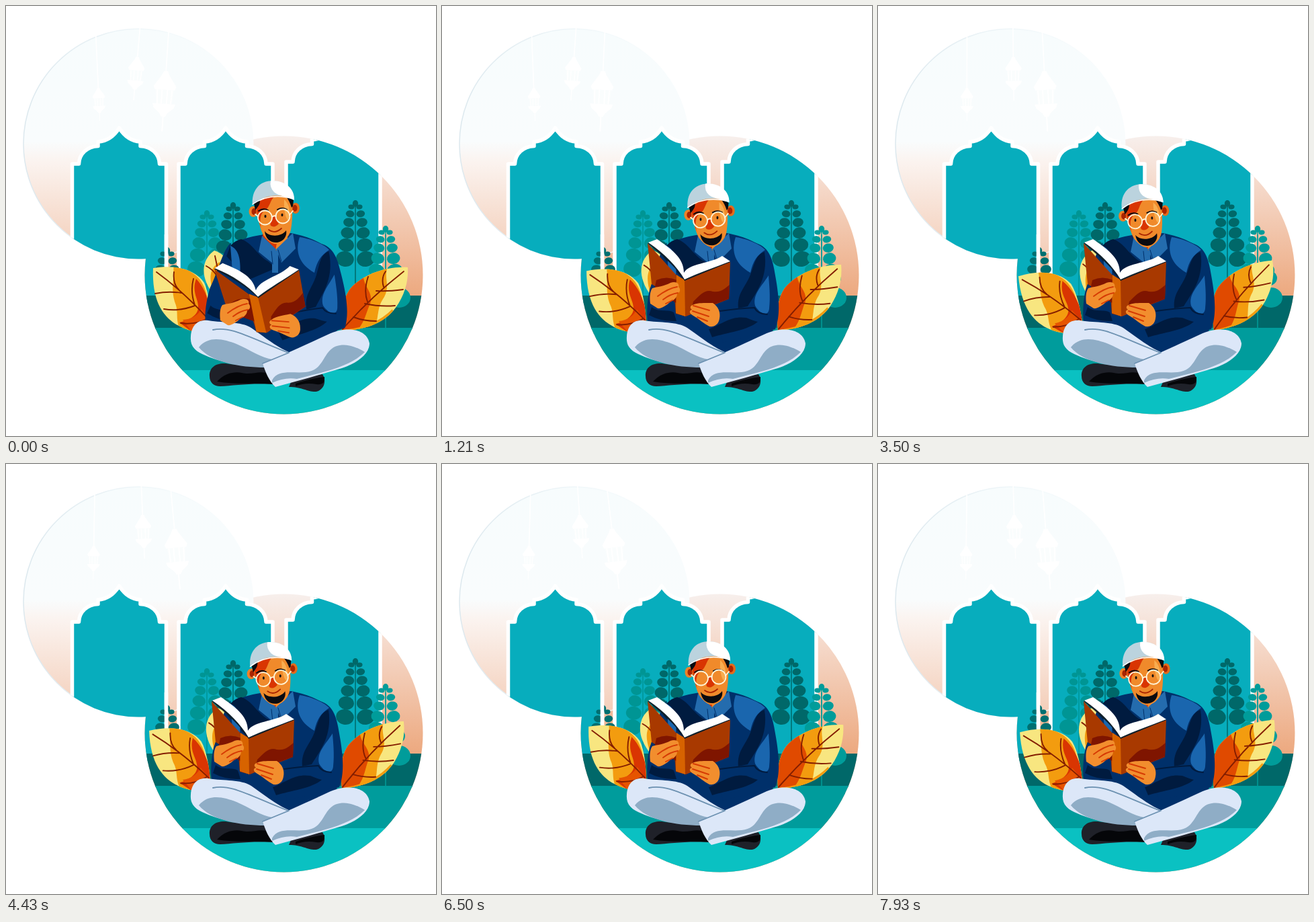
An HTML page for the animation above (8000 ms loop, 640 by 640 pixels).

```html
<!DOCTYPE html>
<html lang="en">
<head>
<meta charset="utf-8">
<title>Reading in the garden</title>
<style>
  html, body { margin: 0; width: 100%; height: 100%; overflow: hidden; background: #fff; }
  svg { display: block; width: 100vw; height: 100vh; }
  .line { fill: none; stroke-linecap: round; stroke-linejoin: round; }
  .vein { stroke: #841e00; stroke-width: 1.9; }
  .finger { stroke: #d63b04; stroke-width: 1.9; }
</style>
</head>
<body>
<svg viewBox="0 0 640 640">
  <defs>
    <linearGradient id="sky" gradientUnits="userSpaceOnUse" x1="0" y1="34" x2="0" y2="376">
      <stop offset="0" stop-color="#f7fcfd"/>
      <stop offset=".49" stop-color="#f9fcfd"/>
      <stop offset=".58" stop-color="#fbf3ef"/>
      <stop offset="1" stop-color="#f3ccb6"/>
    </linearGradient>
    <linearGradient id="dusk" gradientUnits="userSpaceOnUse" x1="0" y1="194" x2="0" y2="440">
      <stop offset="0" stop-color="#f7efec"/>
      <stop offset=".3" stop-color="#f5d9ca"/>
      <stop offset="1" stop-color="#eca67b"/>
    </linearGradient>
    <linearGradient id="rim" x1="0" x2="1">
      <stop offset="0" stop-color="#dce8ee"/>
      <stop offset=".6" stop-color="#f3f9fb"/>
      <stop offset="1" stop-color="#f9fcfd" stop-opacity="0"/>
    </linearGradient>
    <clipPath id="scene"><circle cx="197" cy="205" r="171.5"/><circle cx="413.5" cy="400.5" r="207"/></clipPath>
    <clipPath id="lower"><circle cx="413.5" cy="400.5" r="207"/></clipPath>
    <path id="leafL" d="M220 390C250 385 281 391 295 412C302 427 304 452 304 470L278 484C247 476 216 455 219 390Z"/>
    <path id="leafR" d="M598 389C565 387 531 400 513 420C500 437 499 460 500 483C535 482 562 473 580 449C594 429 599 409 598 389Z"/>
    <clipPath id="leafClipL"><use href="#leafL"/></clipPath>
    <clipPath id="leafClipR"><use href="#leafR"/></clipPath>
    <path id="arch" d="M98.500 445V235H108.500C109 220 121 209 137 208.500V202C152 201 162 192 168.500 181.500C175 192 185 201 200 202V208.500C216 209 228 220 228.500 235H238.500V445"/>
    <g id="lantern" fill="#fff">
      <path d="M-3 0h6l2 5 12 18-2 5h-30l-2-5 12-18z"/>
      <path d="M-14 28h28l-2 21h-24z" fill-opacity=".3"/>
      <path d="M-17 49h34l-2 6-9 8-3 5h-6l-3-5-9-8z"/>
      <path d="M0 66v24M-11 28l1 21M-4 28v21M4 28v21M11 28l-1 21" stroke="#fff" stroke-width="2"/>
    </g>
  </defs>

  <circle cx="413.500" cy="400.500" r="207" fill="url(#dusk)"/>
  <circle cx="197" cy="205" r="171.500" fill="url(#sky)"/>
  <circle cx="197" cy="205" r="171" fill="none" stroke="url(#rim)" stroke-width="1.500"/>

  <g id="lanterns"></g>

  <g clip-path="url(#scene)" fill="#07adbd" stroke="#fff" stroke-width="5.500" stroke-linejoin="round">
    <use href="#arch"/>
    <use href="#arch" x="158.500"/>
    <use href="#arch" x="318.500" y="-3"/>
  </g>

  <g clip-path="url(#lower)">
    <g id="ferns"></g>
    <path d="M238.500 340V445" stroke="#fff" stroke-width="5.500"/>
    <path fill="#006869" d="M200 431h430v50H200z"/>
    <path fill="#009c9c" d="M200 479h430v65H200z"/>
    <path fill="#0ac1c2" d="M200 542h430v70H200z"/>
    <g fill="#009c9a"><ellipse cx="585" cy="434" rx="17" ry="15"/><ellipse cx="579" cy="405" rx="15" ry="12"/></g>
    <path d="M565 340V480" stroke="#009c9a" stroke-width="1.500"/>
  </g>

  <g id="smallLeaf">
    <path fill="#f8e680" d="M310 364C290 378 288 405 311 432L335 425C338 390 330 370 310 364Z"/>
    <path fill="#f39c0f" d="M318 381C303 390 300 405 311 432L335 425Z"/>
    <path class="line vein" d="M311 372Q318 400 316 425M298 387Q308 392 314 402"/>
  </g>

  <g id="leftLeaf">
    <use href="#leafL" fill="#f8e680"/>
    <g clip-path="url(#leafClipL)">
      <path fill="#f39c0f" d="M249 384C251 405 245 420 251 440C259 458 249 465 263 490H310L298 427C292 404 278 394 249 384Z"/>
      <path fill="#d93502" d="M283 406C297 421 303 440 307 468L278 486L258 471C274 468 287 459 286 447C286 436 276 425 283 406Z"/>
      <path fill="#e65400" d="M263 467Q282 466 291 451L304 470L278 487Z"/>
    </g>
    <path class="line vein" d="M224 396Q264 425 302 467M250 396Q248 413 257 422M279 406Q274 425 281 445M222 428Q242 424 261 427M235 451Q258 455 281 446M260 472Q282 475 300 465"/>
  </g>

  <g id="rightLeaf">
    <use href="#leafR" fill="#f8e680"/>
    <g clip-path="url(#leafClipR)">
      <path fill="#f39c0f" d="M570 385C560 402 573 415 563 433C551 450 556 462 548 482H495V400Z"/>
      <path fill="#e04a00" d="M532 401C531 417 548 427 542 443C535 458 535 470 520 486H490V435Z"/>
      <path fill="none" stroke="#f39c0f" stroke-width="4" d="M500 484Q548 481 576 453"/>
    </g>
    <path class="line vein" d="M592 395Q541 435 501 481M565 395Q558 405 562 418M539 403Q532 424 538 440M591 422Q568 425 551 424M579 446Q557 448 534 443M551 469Q533 469 517 463"/>
  </g>

  <g id="shoes">
    <path fill="#1f2129" d="M303 551C302 537 314 531 327 532C351 536 373 531 398 543L408 564C371 560 340 565 319 566C309 566 303 560 303 551Z"/>
    <path fill="#050609" d="M314 559C326 546 340 544 351 546C367 550 377 541 393 548L402 563C370 560 341 564 314 559Z"/>
    <path fill="#1f2129" d="M426 555L471 548C479 560 471 575 458 574C446 573 440 567 421 567Z"/>
    <path fill="#050609" d="M431 562Q450 555 474 552Q475 565 462 563Q445 560 431 566Z"/>
  </g>

  <path fill="#00306a" d="M384 340C352 345 334 352 325 372C317 396 306 425 306 471L420 518L492 486C499 440 494 390 482 364C469 350 445 342 424 338Z"/>
  <path fill="#001b3f" d="M350 347C366 352 374 371 390 380L402 390L360 408L327 371Q333 351 350 347Z"/>
  <path fill="#1a66ae" d="M334 357C347 362 350 379 348 403L337 395Z"/>

  <g id="leftArm">
    <path fill="#00306a" d="M335 352C323 362 320 394 309 422C305 440 304 462 307 474L348 476L350 441L321 441L324 392Z"/>
    <path fill="#001b3f" d="M312 448C321 456 337 451 345 456L349 469Q326 470 308 460Z"/>
  </g>
  <g id="rightArm">
    <path fill="#00306a" d="M464 352C486 357 492 374 496 401C503 439 503 463 496 481L418 501L409 452L444 446L458 398Z"/>
    <path fill="#001b3f" d="M480 366C467 369 465 385 459 400C451 420 439 427 441 450L455 447C467 427 486 405 480 366Z"/>
    <path fill="#1a66ae" d="M486 401C476 417 462 429 466 446C475 461 486 462 487 450C489 431 487 416 486 401Z"/>
    <path fill="#001b3f" d="M397 481C421 471 431 461 453 464Q465 469 470 470C455 483 424 486 402 493Z"/>
    <path class="line" stroke="#001b3f" stroke-width="2" d="M414 454Q442 450 465 449Q469 458 484 459"/>
  </g>
  <path fill="#1a66ae" d="M437 344C456 347 474 355 481 363C469 371 463 379 459 397C436 384 430 365 437 344Z"/>

  <path fill="#f08a2b" d="M384 335H419V352L402 364L384 348Z"/>
  <path fill="#d93502" d="M382 333L403 353L401 364L382 347Z"/>
  <path fill="#246cae" d="M381 342L402 362L397 383L376 366ZM427 338L431 361L410 382L402 362ZM396 364H405V397H396Z"/>
  <path class="line" stroke="#00306a" stroke-width="1" d="M395 365L397 384M405 363L410 380"/>

  <g id="head">
    <ellipse cx="368" cy="310" rx="6.500" ry="8" fill="#ef8129"/>
    <ellipse cx="369" cy="310" rx="3.500" ry="5" fill="#a92400"/>
    <ellipse cx="431" cy="305" rx="6" ry="8" fill="#e46a1b"/>
    <ellipse cx="430" cy="305" rx="3.500" ry="5" fill="#a92400"/>
    <path fill="#f08a2b" d="M372 297C374 320 379 339 384 346C390 354 397 359 403 358C413 357 422 347 424 337C427 321 427 302 423 286H378Z"/>
    <path fill="#d93502" d="M372 300C379 291 391 287 399 288C393 294 393 302 387 307C376 313 377 329 382 340Q374 323 372 300Z"/>
    <path fill="#f8ad50" d="M414 292Q425 301 421 324Q413 318 414 292Z"/>
    <path fill="#0a0b10" d="M369 298L378 291Q379 298 374 304L371 308ZM417 288L428 293L427 302L425 304Q422 294 417 288Z"/>
    <path fill="#0a0b10" d="M385 339C391 348 410 348 417 338C419 349 410 356 402 356C393 356 386 350 385 339Z"/>
    <path fill="#d93502" d="M397 318Q392 328 394 331Q400 335 406 328Q402 324 403 316Z"/>
    <path class="line" stroke="#a92400" stroke-width="1.800" d="M391 337Q400 344 410 335"/>
    <g id="brows" class="line" stroke="#0a0b10" stroke-width="2"><path d="M376 309Q383 304 390 308M404 307Q411 303 418 307"/></g>
    <g id="eyes" fill="#17120f"><ellipse cx="386" cy="317" rx="1.500" ry="2.300"/><ellipse cx="411" cy="315" rx="1.500" ry="2.300"/></g>
    <g class="line" stroke="#fff3d7" stroke-width="1.800"><circle cx="385.500" cy="319" r="10.500"/><circle cx="412" cy="317" r="10.500"/><path d="M396 318Q399 315 402 317M375 317L371 314M422 315L427 309"/></g>
    <path fill="#bbd3de" d="M367 300C365 279 377 264 397 264C416 264 428 276 429 292C410 283 385 284 367 300Z"/>
    <path fill="#fff" d="M394 264C416 263 430 276 429 293C419 287 407 288 399 281Q392 274 394 264Z"/>
    <path class="line" stroke="#fff" stroke-width="1.500" d="M367 299Q393 281 428 291"/>
  </g>

  <g id="legs">
    <path fill="#dce7f8" d="M275 492C276 475 286 466 301 468C326 472 349 469 365 479C384 492 403 508 423 516L386 537C350 537 317 530 292 518C279 512 274 504 275 492Z"/>
    <path fill="#8fadc6" d="M287 508C302 490 324 496 343 503C365 512 381 526 404 527L386 538C347 538 305 530 287 508Z"/>
    <path class="line" stroke="#6c91b1" stroke-width="1.800" d="M308 482C334 476 359 492 420 516"/>
    <path fill="#dce7f8" d="M382 532C421 516 451 502 479 489C506 476 537 480 541 502C541 519 521 532 500 539C467 549 434 558 401 567C392 559 386 545 382 532Z"/>
    <path fill="#8fadc6" d="M396 557C405 540 426 547 446 545C477 542 470 509 497 505C512 503 524 509 534 515C512 537 475 544 433 555Q415 552 396 561Z"/>
    <path class="line" stroke="#6c91b1" stroke-width="1.800" d="M382 532L421 516"/>
  </g>

  <g id="book">
    <path fill="#a83900" d="M306 353L350 402L361 407L429 381L427 436L363 462L348 458L346 434L312 414Z"/>
    <path fill="#7f1500" d="M319 408Q334 401 350 408V443L316 422ZM374 440C384 430 392 421 403 425C416 427 421 420 428 415L427 436L370 458Z"/>
    <path fill="#d76300" d="M349 400L361 408L362 462L348 457Z"/>
    <path fill="#10202b" d="M306 353L320 347L361 402L415 373L429 381L361 409Q350 389 306 353Z"/>
    <path fill="#fff" d="M307 352L320 347C340 361 360 374 360 397C369 382 399 384 417 372L429 380C404 390 382 397 361 407C350 388 331 368 307 352Z"/>
  </g>
  <g id="leftHand">
    <path fill="#f28e2e" d="M313 420C320 418 331 417 340 412C348 409 354 413 352 418C356 422 354 427 350 428C350 434 345 438 340 440C334 446 326 451 321 450L310 443C309 434 309 426 313 420Z"/>
    <path class="line finger" d="M350 418Q337 420 321 432M351 427Q339 429 329 437M343 438L333 443"/>
  </g>
  <g id="rightHand">
    <path fill="#f28e2e" d="M371 446C378 441 391 442 403 442C411 447 415 456 413 465C412 474 405 478 398 477C390 473 383 466 374 461C367 457 368 453 372 452Q368 449 371 446Z"/>
    <path class="line finger" d="M374 446L398 453M373 454L397 462M380 463L395 469"/>
  </g>
</svg>
<script>
const LOOP = 8000;
const SWAY = 6000;
const NS = "http://www.w3.org/2000/svg";
const byId = id => document.getElementById(id);

function add(parent, tag, attrs) {
  const node = document.createElementNS(NS, tag);
  for (const key in attrs) node.setAttribute(key, attrs[key]);
  return parent.appendChild(node);
}

function fern(x, top, color, rows, bottom) {
  const plant = add(byId("ferns"), "g", { fill: color });
  add(plant, "path", { d: `M${x} ${top + 4}V${bottom}`, stroke: color, "stroke-width": 1.5 });
  add(plant, "ellipse", { cx: x, cy: top + 4, rx: 4.2, ry: 5 });
  for (let i = 0; i < rows; i++) {
    const y = top + 9 + 9 * i + 1.3 * i * i;
    for (const side of [-1, 1]) {
      add(plant, "ellipse", {
        rx: 4.6 + 1.75 * i, ry: 3.5 + 1.6 * i,
        transform: `translate(${x + side * (6 + 1.9 * i)} ${y}) rotate(${side < 0 ? 10 : -10})`
      });
    }
  }
}
fern(240, 360, "#006f70", 3, 440);
fern(299, 305, "#009594", 6, 440);
fern(338, 293, "#006869", 5, 440);
fern(520, 290, "#006869", 6, 440);
fern(565, 328, "#009c9a", 5, 440);

// Pivot x, string length, scale, first and last angle
const lanterns = [
  [132.5, 104, 0.55, -2.7, 1.7],
  [200.7, 58, 0.72, 5, -4],
  [243.4, 79, 1, 3.8, -7]
].map(([x, drop, scale, from, to]) => {
  const node = add(byId("lanterns"), "g", {});
  add(node, "path", { d: `M${x} 24V${18 + drop}`, stroke: "#fff", "stroke-width": 1.6 });
  add(node, "use", { href: "#lantern", transform: `translate(${x} ${18 + drop}) scale(${scale})` });
  return { node, x, from, to };
});

const mix = (a, b, p) => a + (b - a) * p;
const clamp = p => Math.min(1, Math.max(0, p));
const smooth = p => (1 - Math.cos(Math.PI * clamp(p))) / 2;
const move = (id, value) => byId(id).setAttribute("transform", value);

// Head tilt with rests at both ends
const tiltSteps = [[0, 0], [860, 0], [1210, -1], [1930, -1.9], [2500, -3], [4300, -3], [5250, 0], [6000, 0]];
function sample(steps, t) {
  const i = Math.max(1, steps.findIndex(step => step[0] >= t));
  const [t0, a] = steps[i - 1], [t1, b] = steps[i];
  return mix(a, b, (t - t0) / (t1 - t0));
}

const blinks = [2570, 4000, 6500];

function draw(t) {
  const sway = (1 - Math.cos(2 * Math.PI * t / SWAY)) / 2;
  const swing = (1 - Math.cos(Math.PI * t / SWAY)) / 2;
  const low = 1 - smooth(t / 930);

  for (const l of lanterns) {
    l.node.setAttribute("transform", `rotate(${mix(l.from, l.to, swing)} ${l.x} 18)`);
  }
  move("leftLeaf", `rotate(${-8.3 * sway} 303 470)`);
  move("rightLeaf", `rotate(${-6.8 * sway} 500 482)`);
  move("smallLeaf", `rotate(${8 * sway} 322 440)`);

  const tilt = sample(tiltSteps, t % SWAY);
  move("head", `translate(0 ${-4 * low - tilt / 3}) rotate(${tilt} 400 375)`);
  const open = clamp(Math.min(...blinks.map(b => Math.abs(t - b))) / 70 - 0.6);
  move("eyes", `translate(0 ${317 * (1 - open)}) scale(1 ${open})`);
  move("brows", `translate(0 ${1 - open})`);

  const held = `translate(${14 * low} ${26 * low}) rotate(${-12 * low} 360 407)`;
  move("book", held);
  move("rightHand", held);
  move("leftHand", `translate(${9 * low} ${25 * low})`);
  move("leftArm", `rotate(${5 * low} 335 360)`);
  move("rightArm", `rotate(${-4 * low} 470 360)`);
}

function frame() {
  draw(performance.now() % LOOP);
  requestAnimationFrame(frame);
}
frame();
</script>
</body>
</html>
```
